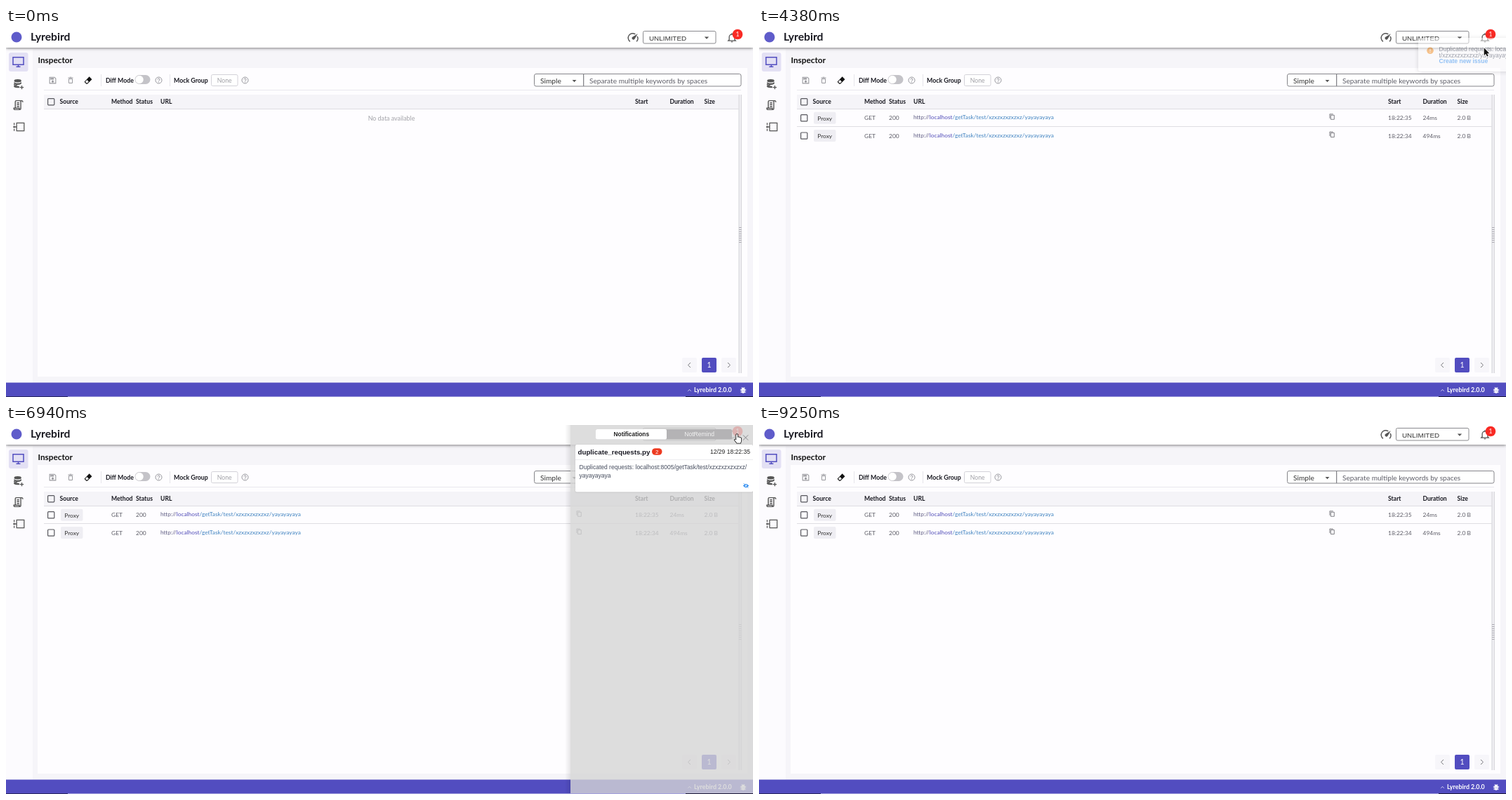
An HTML page with a canvas for the animation above (9370 ms loop, 1064 px wide and 526 px high).

```html
<!DOCTYPE html>
<html lang="en">
<head>
<meta charset="utf-8">
<title>Inspector</title>
<style>
  html, body { margin: 0; width: 100%; height: 100%; overflow: hidden; background: #f6f5f9; }
  canvas { display: block; }
</style>
</head>
<body>
<canvas id="stage" width="1064" height="526"></canvas>
<script>
const W = 1064, H = 526, LOOP = 9370;
const LATO = 'Lato, sans-serif', SANS = '"Liberation Sans", Arial, sans-serif';
const PURPLE = '#524dc0', DARK = '#1a1a22', GREY = '#5e5e68', BODY = '#464d5e';
const TARGET = 'localhost:8005/getTask/tes';

const screen = document.getElementById('stage').getContext('2d');
let c = screen;

function text(s, x, y, size, color = DARK, { bold, font = LATO, align = 'left' } = {}) {
  c.font = `${bold ? 'bold ' : ''}${size}px ${font}`;
  c.textAlign = align;
  c.fillStyle = color;
  c.fillText(s, x, y);
  return c.measureText(s).width;
}
function rect(x, y, w, h, color) {
  c.fillStyle = color;
  c.fillRect(x, y, w, h);
}
function box(x, y, w, h, r, fill, line, lw = 1) {
  c.beginPath();
  c.roundRect(x, y, w, h, r);
  if (fill) { c.fillStyle = fill; c.fill(); }
  if (line) { c.strokeStyle = line; c.lineWidth = lw; c.stroke(); }
}
function dot(x, y, r, color) {
  c.beginPath();
  c.arc(x, y, r, 0, 7);
  c.fillStyle = color;
  c.fill();
}
function shadow(blur, dy, color) {
  c.shadowBlur = blur;
  c.shadowOffsetY = dy;
  c.shadowColor = color;
}

// Icons live on a 24 unit grid, centred on (x, y).
function icon(name, x, y, size, color, lw = 2) {
  const [line, solid] = ICONS[name];
  c.save();
  c.translate(x - size / 2, y - size / 2);
  c.scale(size / 24, size / 24);
  c.strokeStyle = c.fillStyle = color;
  c.lineWidth = lw;
  if (line) c.stroke(new Path2D(line));
  if (solid) c.fill(new Path2D(solid), 'evenodd');
  c.restore();
}
const ICONS = {
  monitor: ['M2 3H22V17H2ZM8 21H16M12 17V21'],
  data: ['M14 20Q2 20 2 17M2 12.5Q2 15 9 15.2M19 16V24M15 20H23',
    'M10 2A8 3.5 0 1 0 10 9A8 3.5 0 1 0 10 2ZM2 8Q5 11 10 11T18 8V12Q14 14.5 10 14.5T2 12ZM2 14Q5 17 10 17H13V20Q2 21 2 17Z'],
  script: ['M6 17V5Q6 3 8 3H19Q21 3 21 6M17 8V19Q17 21 15 21H5Q3 21 3 18H14Q14 21 16 21M19 3Q17 3 17 6V9M9 7.5H14M9 11H14M9 14.5H14'],
  plug: ['M8 4H23V20H8ZM3 4V8M3 10V14M3 16V20M1 12H8'],
  save: ['M4 4H16.5L20 7.5V20H4Z', 'M6 6H15V10H6ZM12 12A3 3 0 1 0 12 18A3 3 0 1 0 12 12Z'],
  trash: ['M7 8H17V20H7ZM5 5H19M9.5 3.5H14.5'],
  eraser: [, 'M15 2.5L22 9.5L10 21.5H7L2 16ZM4.5 16L8 19.5H9.5L13.5 15.5L9 11.2Z'],
  help: ['M12 3A9 9 0 1 0 12 21A9 9 0 1 0 12 3ZM9 10A3 3 0 1 1 13.5 12.5Q12 13.5 12 15M12 16.2V18.2'],
  copy: ['M7 6H20V22H7ZM3 18V2H16'],
  gauge: ['M5.5 19.5A9 9 0 0 1 16 4.8M20 9A9 9 0 0 1 18.5 19.5', 'M21 4L14.7 14.5A3 3 0 1 1 10.5 10.3Z'],
  bell: ['M4 19H20L18 17V11A6 6 0 0 0 6 11V17ZM12 2.5V5', 'M10 21H14A2 2 0 0 1 10 21Z'],
  down: [, 'M5 8.5H19L12 16Z'],
  up: ['M6 15L12 9L18 15'],
  left: ['M15 5L8 12L15 19'],
  right: ['M9 5L16 12L9 19'],
  cross: ['M4 4L20 20M20 4L4 20'],
  bug: ['M3 10H21M3 14H21M4 19H20M7 3L10 6M17 3L14 6', 'M7 8Q8 4 12 4T17 8V17Q16 22 12 22T7 17ZM10 11V12.5H14V11ZM10 15V16.5H14V15Z'],
  eye: ['M3 3L21 21', 'M1 12Q6 5 12 5T23 12Q18 19 12 19T1 12ZM12 8A4 4 0 1 0 12 16A4 4 0 1 0 12 8Z'],
};

function header() {
  c.save();
  shadow(4, 1, 'rgba(0,0,0,.5)');
  rect(0, 0, W, 28, '#fff');
  c.restore();
  dot(15, 13, 7.5, '#5f5cca');
  text('Lyrebird', 35, 18, 15.7, DARK, { bold: true });
  icon('gauge', 893.5, 14, 17, '#555');
  box(907.5, 4.5, 103.5, 17.5, 2, '#fff', '#8a8a8e');
  text('UNLIMITED', 916, 17.5, 9.85, '#333', { font: SANS });
  icon('down', 998, 14, 11, '#555');
  icon('bell', 1034, 13.5, 15.5, '#555');
  dot(1042, 9, 7.3, '#f92a24');
  text('1', 1042, 12, 8.5, '#fff', { align: 'center' });
}

function sidebar() {
  rect(0, 30, 38, 476, '#fcfbfe');
  box(4, 35, 27.5, 27, 3, '#e3e0f4');
  icon('monitor', 17.5, 48.5, 18, PURPLE);
  icon('data', 18, 79.5, 15.5, '#555');
  icon('script', 17.5, 110, 17, '#555');
  icon('plug', 18, 141, 17, '#555', 1.8);
}

function toolbar() {
  icon('save', 66.5, 74.5, 13, '#99999e');
  icon('trash', 92, 74.5, 12, '#99999e');
  icon('eraser', 117, 74.5, 13, '#111');
  rect(135, 66, 1, 17, '#e6e5ea');
  text('Diff Mode', 142, 77.5, 8.8, DARK, { bold: true });
  box(183.5, 67, 22, 13, 6.5, '#c4c3c8');
  dot(190, 73.5, 5.7, '#fff');
  icon('help', 217.5, 74.5, 12, '#8a8a90', 1.8);
  rect(233, 66, 1, 17, '#e6e5ea');
  text('Mock Group', 239, 77.5, 8.8, DARK, { bold: true });
  box(292.5, 66.5, 37.5, 16, 2, '#fff', '#d3d2d8');
  text('None', 311.2, 77.5, 8.7, '#a0a0a6', { align: 'center' });
  icon('help', 340.5, 74.5, 12, '#8a8a90', 1.8);
  box(752.5, 65.5, 294.5, 17.5, 2.5, '#fff', '#85858a');
  rect(822, 65.5, 1.3, 17.5, '#85858a');
  text('Simple', 761, 78.5, 10.2, '#333');
  icon('down', 809.5, 75.5, 10, '#555');
  text('Separate multiple keywords by spaces', 831, 78.5, 10.15, GREY);
  rect(54, 88, 993, 1, '#e9e8ed');
}

function checkbox(y) {
  box(59.6, y - 4.6, 9.2, 9.2, 1, null, '#56565c', 1.2);
}

function tableHead() {
  rect(54, 95, 990, 20, '#f5f4f8');
  rect(54, 115, 990, 1, '#dedde2');
  checkbox(105.2);
  const heads = { Source: 76.5, Method: 150, Status: 185, URL: 220, Start: 896, Duration: 945.5, Size: 994.5 };
  for (const name in heads) text(name, heads[name], 108.2, 8.65, DARK, { bold: true });
}

function row(y, start, duration, lift) {
  const cell = (s, x) => text(s, x, y + 3, 8.45, GREY);
  checkbox(y);
  box(78, y - 8.5, 31.5, 17, 2, '#efeef3');
  text('Proxy', 83.3, y + 3.2, 8.35, '#333');
  cell('GET', 150);
  cell('200', 185);
  let x = 220;
  for (const [s, color] of [['http://', '#605e84'], ['localhost', '#504cb8'], ['/getTask/test/xzxzxzxzxzxz/yayayayaya', '#3f82c0']])
    x += text(s, x, y + 2.8 - lift, 8.35, color);
  icon('copy', 816.3, y - 1 - lift, 9, '#66666c', 2.2);
  cell(start, 896);
  cell(duration, 945.5);
  cell('2.0 B', 994.5);
}

function table(t) {
  tableHead();
  if (t < 1000) text('No data available', 549, 131.5, 8.9, '#a2a2a8', { align: 'center' });
  else if (t < 1880) row(128.3, '18:22:34', '494ms', 0);
  else {
    row(128.3, '18:22:35', '24ms', 0.8);
    rect(54, 140, 990, 1, '#dedde2');
    row(153.6, '18:22:34', '494ms', 0.8);
  }
}

function frame() {
  rect(1043.5, 95, 4.5, 397, '#efeef2');
  rect(1043.5, 95, 1, 397, '#d8d7dc');
  rect(1047, 95, 1, 397, '#d8d7dc');
  for (let y = 284; y < 306; y += 3) rect(1044, y, 3.5, 1, '#aaa9b0');
  box(963, 470, 21, 21, 2, '#f7f6fa');
  box(1019, 470, 21, 21, 2, '#f7f6fa');
  box(991, 470, 21, 21, 2, PURPLE);
  icon('left', 973.5, 480.5, 12, '#77777c');
  icon('right', 1029.5, 480.5, 12, '#77777c');
  text('1', 1001.5, 484.3, 10.5, '#fff', { align: 'center' });
  rect(0, 505.5, W, 20.5, PURPLE);
  icon('up', 973.5, 516.5, 9, '#fff');
  text('Lyrebird 2.0.0', 980, 519, 8.9, '#fff', { bold: true });
  icon('bug', 1050, 516.2, 11, '#fff');
}

// The window's lower edge stays above every panel.
function bottomEdge() {
  rect(0, 525, 88, 1, '#2a2860');
  rect(88, 525, 880, 1, '#a3a1dc');
  rect(968, 525, 96, 1, '#1c1a38');
}

function page(t) {
  rect(0, 0, W, H, '#f6f5f9');
  sidebar();
  header();
  text('Inspector', 45.5, 50, 11.8, '#111', { bold: true });
  rect(45, 57, 1011, 440, '#fefdff');
  toolbar();
  table(t);
  frame();
}

function drawNotice() {
  c.save();
  shadow(7, 1, 'rgba(0,0,0,.28)');
  box(812, 14, 235.5, 48, 3, '#fff');
  c.restore();
  dot(829, 32.3, 4.8, '#f7901e');
  rect(828.5, 29.5, 1, 3.6, '#fff');
  rect(828.5, 34.2, 1, 1, '#fff');
  const font = { font: SANS };
  text('Duplicated requests: ' + TARGET, 841.5, 33, 8.53, BODY, font);
  text('t/xzxzxzxzxzxz/yayayayaya', 841.5, 41.5, 8.53, BODY, font);
  text('Create new issue', 841.5, 50, 8.55, '#2d8cf0', { bold: true, font: SANS });
  icon('cross', 1034, 30.5, 8, '#a0a0a6', 1.8);
}

function drawDrawer() {
  const edge = c.createLinearGradient(796, 0, 804, 0);
  edge.addColorStop(0, 'rgba(0,0,0,0)');
  edge.addColorStop(1, 'rgba(0,0,0,.09)');
  rect(796, 0, 8, H, edge);
  rect(804, 0, 260, H, 'rgba(213,213,213,.8)');
  box(840, 6, 194, 14.5, 2, '#b4b3b5');
  box(840, 6, 101, 14.5, 2, '#fff');
  text('Notifications', 890.8, 16.3, 8.35, '#222', { bold: true, font: SANS, align: 'center' });
  text('NotRemind', 987.6, 16.3, 8.55, '#f2f2f2', { font: SANS, align: 'center' });
  icon('cross', 1053.5, 18, 11, '#77777c', 1.8);
  c.save();
  shadow(2, 0.5, 'rgba(0,0,0,.14)');
  box(811, 28, 253, 67.5, 2, '#fff');
  c.restore();
  rect(811, 49, 253, 1, '#ececf0');
  text('duplicate_requests.py', 814.5, 41.5, 9.75, '#1a1a24', { bold: true, font: SANS });
  box(920, 33.2, 14.5, 9.6, 4.8, '#ed3a20');
  text('2', 927.2, 41, 8, '#fff', { font: SANS, align: 'center' });
  text('12/29 18:22:35', 1060, 41.3, 8.55, '#222', { font: SANS, align: 'right' });
  text('Duplicated requests: ' + TARGET + 't/xzxzxzxzxzxz/', 816.5, 62.5, 8.53, BODY, { font: SANS });
  text('yayayayaya', 816.5, 75.3, 8.53, BODY, { font: SANS });
  icon('eye', 1054, 86.5, 9, '#2d8cf0');
}

// Panels are painted once so they can fade as a whole.
function layer(draw) {
  const cv = document.createElement('canvas');
  cv.width = W;
  cv.height = H;
  c = cv.getContext('2d');
  draw();
  c = screen;
  return cv;
}
const notice = layer(drawNotice), drawer = layer(drawDrawer);

const ease = k => { k = Math.min(1, Math.max(0, k)); return k * k * (3 - 2 * k); };
const shown = (t, from, to) => ease((t - from) / 300) - ease((t - to) / 300);

function slide(panel, width, k) {
  if (k <= 0) return;
  c.globalAlpha = k;
  c.drawImage(panel, Math.round((1 - k) * width), 0);
  c.globalAlpha = 1;
}

// Pointer stops: time, x, y of the tip.
const PATH = [
  [3690, 1052, 44], [4120, 1033, 29], [4350, 1033, 29], [4560, 1028, 15],
  [4810, 1028, 15], [5200, 1039.5, 4], [5640, 1039.5, 4], [5900, 1033.5, 10],
  [6690, 1033.5, 10], [7000, 1042, 13], [7630, 1042, 13], [8000, 1050, 3],
];

function pointer(t) {
  const i = PATH.findIndex(p => p[0] > t);
  if (i < 1) return;
  const [t0, x0, y0] = PATH[i - 1], [t1, x1, y1] = PATH[i];
  const k = ease((t - t0) / (t1 - t0));
  const hand = t > 6900 && t < 7630;
  const shape = new Path2D(hand
    ? 'M-1 1Q0-.5 1 1V5Q3 4 4 5.5Q6 5 6 7V10L5 13H0L-3.5 8.5Q-3.5 7-1 8.5Z'
    : 'M0 0V11L2.5 8.7L4.2 12.4L6 11.6L4.4 8H7.6Z');
  c.save();
  c.translate(x0 + (x1 - x0) * k, y0 + (y1 - y0) * k);
  c.lineWidth = 1.6;
  c.strokeStyle = hand ? '#111' : '#fff';
  c.fillStyle = hand ? '#fff' : '#111';
  c.stroke(shape);
  c.fill(shape);
  c.restore();
}

function render(now) {
  const t = now % LOOP;
  page(t);
  slide(notice, 252, shown(t, 2060, 4230));
  slide(drawer, 260, shown(t, 5640, 7142));
  bottomEdge();
  pointer(t);
  requestAnimationFrame(render);
}
render(0);
</script>
</body>
</html>
```
